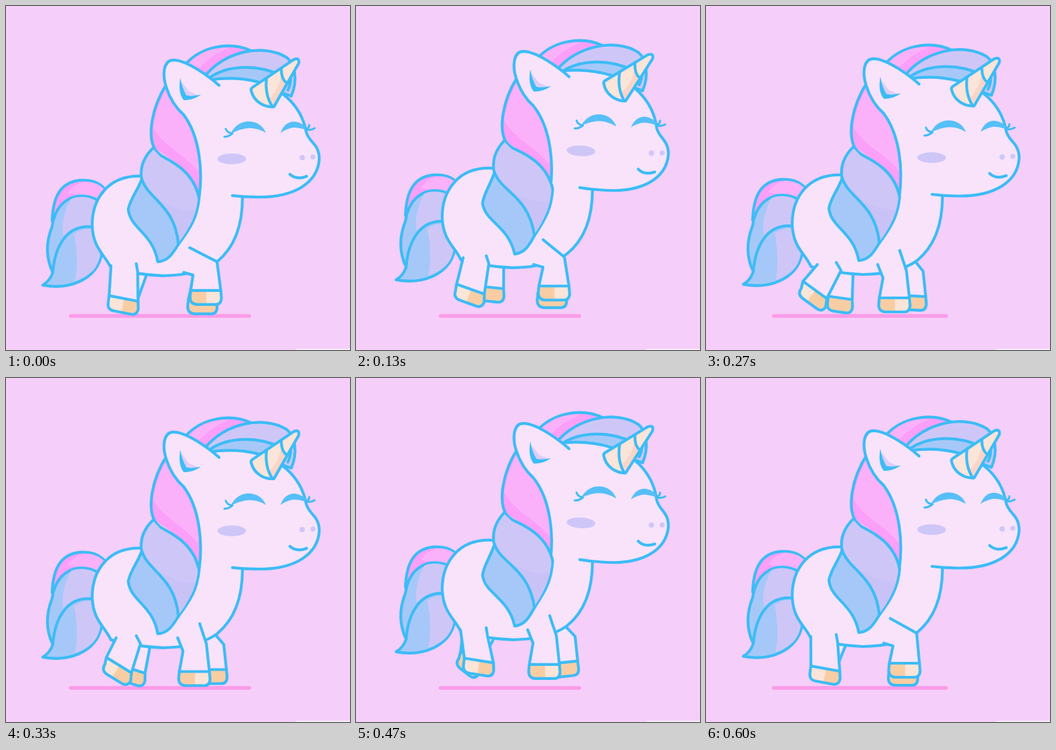
These frames come from a looping animation (515 by 515 pixels, 0.67 s). An HTML page with a canvas:

```html
<!DOCTYPE html>
<html>
<head>
<meta charset="utf-8">
<title>Trotting unicorn</title>
<style>
html, body { margin: 0; width: 100%; height: 100%; overflow: hidden; background: #f5cef9; }
canvas { display: block; }
</style>
</head>
<body>
<canvas id="stage" width="515" height="515"></canvas>
<script>
const ctx = document.getElementById('stage').getContext('2d');
const INK = '#3cbcf6', SKIN = '#f8e3fa', PINK = '#fb9ff8', ROSE = '#fab1fa';
const BLUE = '#a6c8f8', LILAC = '#cfc6f8', PEACH = '#f9cda4', CREAM = '#fbe4d8';
const LOOP = 670, STEPS = 10;

// Key poses of each hoof: step, x, y, tilt in degrees
const HIND_NEAR = [[0, 176, 438, 11], [3, 169, 435, 24], [4, 163, 427, 36], [6, 175, 433, 27], [7, 184, 435, 9]];
const HIND_FAR = [[0, 180, 434, 15], [1, 198, 433, 5], [3, 208, 434, 7], [4, 201, 439, 8], [7, 171, 432, 38]];
const FORE_NEAR = [[0, 299, 426, 0], [3, 295, 434, 0], [4, 282, 439, 0], [7, 282, 441, 0], [9, 297, 429, 0]];
const FORE_FAR = [[0, 294, 440, 0], [3, 293, 444, 0], [4, 308, 436, 3], [7, 311, 438, -6], [9, 295, 441, 0]];

function pose(keys, step) {
  const i = keys.findLastIndex(key => key[0] <= step);
  const from = keys[i], to = keys[(i + 1) % keys.length];
  const mix = (step - from[0]) / ((to[0] || STEPS) - from[0]);
  const [x, y, tilt] = [1, 2, 3].map(n => from[n] + (to[n] - from[n]) * mix);
  return { x, y, tilt };
}

function fill(d, color) {
  ctx.fillStyle = color;
  ctx.fill(new Path2D(d));
}
function line(d, width = 4.2, color = INK) {
  ctx.lineWidth = width;
  ctx.strokeStyle = color;
  ctx.stroke(new Path2D(d));
}
function shape(d, color) {
  fill(d, color);
  line(d);
}
function dot(x, y, rx, ry) {
  ctx.beginPath();
  ctx.ellipse(x, y, rx, ry, 0, 0, 7);
  ctx.fillStyle = LILAC;
  ctx.fill();
}
function part(dx, dy, degrees, px, py, draw) {
  ctx.save();
  ctx.translate(px + dx, py + dy);
  ctx.rotate(degrees * Math.PI / 180);
  ctx.translate(-px, -py);
  draw();
  ctx.restore();
}

// left and right run from the hip down to the hoof
function leg({ x, y, tilt }, half, left, right, tones) {
  const a = tilt * Math.PI / 180, cx = half * Math.cos(a), cy = half * Math.sin(a);
  const l = [...left, [x - cx, y - cy]];
  const r = [...right, [x + cx, y + cy]];
  fill('M' + [...l, ...r.slice().reverse()].join('L') + 'Z', SKIN);
  line('M' + l.join('L'));
  line('M' + r.join('L'));
  part(x, y, tilt, 0, 0, () => {
    const skew = tilt / 7, heel = skew - half - 1, toe = skew + half + 1;
    const end = `L${toe - 9} 21Q${toe} 21 ${toe} 11L${half} 0Z`;
    const hoof = `M${-half} 0L${heel} 10Q${heel} 21 ${heel + 11} 21` + end;
    fill(hoof, tones[0]);
    fill('M1 0L1 21' + end, tones[1]);
    line(hoof);
  });
}

function tail() {
  shape('M149 275C138 263 126 260 111 261C80 264 70 288 69 322L135 300Z', PINK);
  fill('M147 274C137 265 128 263 117 263Q100 268 92 280L135 290Z', ROSE);
  shape('M137 291C124 283 103 281 88 293C75 303 70 320 69 330C59 355 60 378 70 399C67 408 62 414 55 418C92 425 135 412 143 372Z', BLUE);
  fill('M135 292C124 285 109 284 97 289Q81 320 86 345Q105 329 130 331Z', LILAC);
  fill('M130 333Q115 333 102 341Q110 385 103 412C125 404 137 394 141 373Z', LILAC);
  line('M70 399C73 360 91 326 130 331');
}

function body() {
  const d = 'M205 255C152 252 129 290 129 328C130 364 149 373 157 392Q192 402 235 404Q289 403 316 383Q354 352 354 287';
  fill(d, SKIN);
  line(d);
}

function sideMane() {
  fill('M241 116C216 155 213 195 222 213C250 232 278 245 289 288C295 247 290 195 266 163Z', PINK);
  fill('M243 118C230 140 222 165 220 182C236 211 267 222 290 250C292 215 284 187 266 163Z', ROSE);
  line('M241 116C216 155 213 195 222 213');
  line('M266 163C290 195 295 247 289 288');
}

function lock() {
  shape('M221 212C206 226 200 242 203 260C195 280 187 287 183 304C185 333 220 340 227 383C243 382 250 370 258 357C276 333 286 317 289 288C281 246 245 232 232 224Q225 219 221 212Z', BLUE);
  fill('M221 215C208 228 203 242 205 260C213 287 252 297 258 354C276 331 284 315 287 290C279 248 244 234 231 226Z', LILAC);
  fill('M229 290C254 305 272 309 284 306Q276 332 259 354Q252 312 229 290Z', '#c9c2f7');
  line('M203 258C211 289 253 297 258 357');
}

function crown() {
  shape('M268 88C291 62 333 51 369 68L310 108Z', PINK);
  fill('M271 88C291 67 312 62 334 63Q309 72 290 92Z', ROSE);
  shape('M297 106C327 67 386 56 420 77C433 87 437 112 427 135L400 125Z', LILAC);
  shape('M304 108C328 90 372 85 412 104L400 120L312 112Z', BLUE);
  line('M426 108Q426 118 422 126');
}

function face() {
  const d = 'M304 111Q343 105 378 114C405 120 441 145 449 187C452 204 469 205 469 229C467 263 434 288 372 286Q355 286 339 284';
  fill(d + 'L270 283L264 160Z', SKIN);
  line(d);

  fill('M336 192Q345 173 364 173Q382 174 389 190Q377 183 364 183Q349 184 336 192Z', '#56bff7');
  fill('M411 190Q417 173 432 173Q445 174 451 186Q440 182 430 182Q419 184 411 190Z', '#56bff7');
  line('M329 184Q331 190 339 191M327 196Q333 196 339 191M449 184Q454 183 454 178M449 185Q456 187 462 183', 3);

  dot(338, 229, 21.5, 8);
  dot(443.5, 227, 4, 4);
  dot(459.5, 226, 3.7, 3.7);
  line('M425 252Q435 261 450 255');
}

function ear() {
  const d = 'M319 119C302 104 270 81 250 81C235 82 234 104 240 122Q248 147 266 163';
  fill(d + 'Z', SKIN);
  line(d);
  fill('M263 114L274 128L288 134L268 138Z', '#dccdf8');
  fill('M261 108Q257 130 266 141Q279 142 292 133Q278 136 270 134Q264 124 261 108Z', INK);
}

function horn() {
  const d = 'M369 122L431 80Q440 77 438 86L401 151C386 152 371 143 367 127Q366 124 369 122Z';
  fill(d, CREAM);
  fill('M412 104Q415 113 421 117L401 150Q395 147 393 140Q408 127 412 104Z', '#fad4c8');
  line(d);
  line('M390 108Q387 133 399 151M412 94Q412 110 421 116');
}

function draw(step) {
  const bob = 6 + 6.3 * Math.cos(2 * Math.PI * (step - 2.2) / 5), b = bob / 12;
  const raised = step < 4 || step > 7;
  const [hindNear, hindFar, foreNear, foreFar] =
    [HIND_NEAR, HIND_FAR, FORE_NEAR, FORE_FAR].map(keys => pose(keys, step));

  ctx.fillStyle = '#f5cef9';
  ctx.fillRect(0, 0, 515, 515);
  fill('M433 515Q433 513 438 513L515 513L515 515Z', '#f7edfa');
  line(`M${96.5 + bob * 2.5} 464H${364.5 - bob * 2.5}`, 5.5, '#fb9be8');

  part(5 * b, -8 * b, 0, 0, 0, tail);
  part(0, -bob, 0, 0, 0, () => {
    leg(hindFar, 18, [[160, 390]], [[140 + 0.4 * hindFar.x, 398]], [PEACH, PEACH]);
    leg(foreFar, 21, [[285, 385]], [[308, 378], [foreFar.x + 17, 399]], [PEACH, PEACH]);
    body();
    leg(hindNear, 22, [[153 + 0.38 * hindNear.tilt, 389]],
      [[195, 386], [195 + 0.2 * hindNear.tilt, 398]], [CREAM, PEACH]);
    const [left, right] = raised
      ? [[[266, 399], [280, 403]], [[275 + 5 * b, 362], [316 - 4 * b, 383 + 5 * b]]]
      : [[[257, 389], [265, 409]], [[290, 368], [300, 398]]];
    leg(foreNear, 22.5, left, right, [PEACH, CREAM]);
  });

  const head = paint => part(0, -bob, 2.9 * b, 338, 205, paint);
  part(2 * b, -8 * b, 0, 0, 0, crown);
  head(face);
  part(1.5 * b, -11 * b, 0, 0, 0, sideMane);
  part(1.5 * b, -11 * b, -3 * b, 221, 212, lock);
  part(0, -13 * b, 0, 0, 0, ear);
  head(horn);
}

// Each step starts on a whole hundredth of a second
const start = step => Math.round(step * 20 / 3) * 10;

function tick() {
  const t = performance.now() % LOOP;
  let step = STEPS - 1;
  while (t < start(step)) step--;
  draw(step);
  requestAnimationFrame(tick);
}

ctx.lineCap = ctx.lineJoin = 'round';
tick();
</script>
</body>
</html>
```
